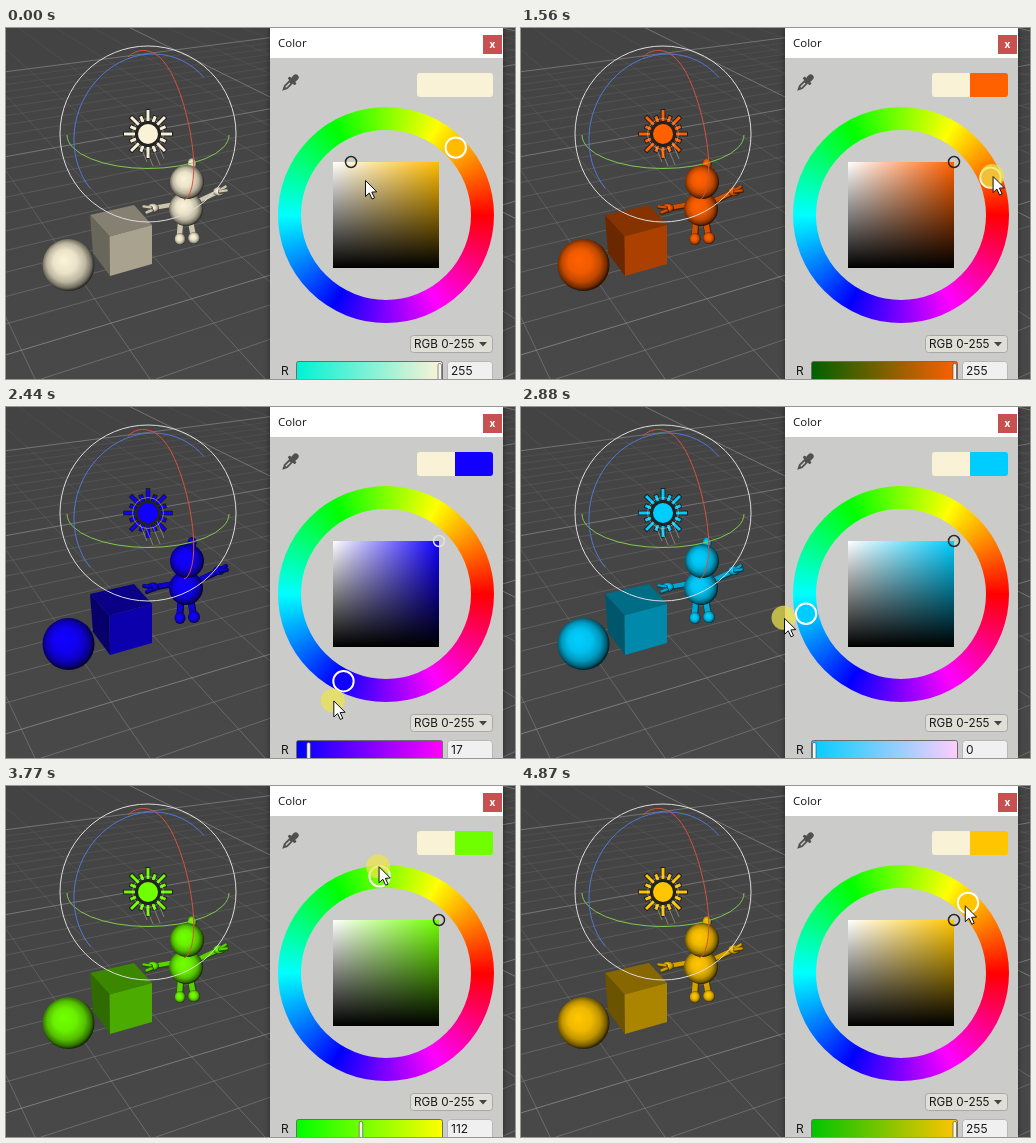
An HTML page with a canvas for the animation above (4990 ms loop, 509 px wide and 351 px high).

```html
<!DOCTYPE html>
<html lang="en">
<head>
<meta charset="utf-8">
<title>Light color picker</title>
<style>
html, body { margin: 0; width: 100%; height: 100%; overflow: hidden; background: #464646; }
canvas { display: block; width: 509px; height: 351px; }
</style>
</head>
<body>
<canvas id="stage" width="509" height="351"></canvas>
<script>
const ctx = document.getElementById('stage').getContext('2d');
const W = 509, H = 351, LOOP = 4990, STEP = 110.9;
const TAU = Math.PI * 2, RAD = Math.PI / 180;
const RING = { x: 380, y: 187, inner: 85, outer: 108, mid: 96.5, marker: 97 };
const BOX = { x: 327, y: 134, size: 106 };
const PALE = [250, 242, 214];
const UI = 'Inter, sans-serif';

// Keys: [step, value...]
const FREE = [[0, 359.5, 152.5], [2, 349, 141], [3, 346, 134], [7, 397, 132], [10, 434, 133], [12, 450, 120]];
const ORBIT = [[12, 44, 97], [13, 38, 98], [18, -38.7, 107], [22, -116, 119],
  [31, -233.5, 119], [37, -299, 94], [39, -309, 93], [40, -313, 93], [41, -313.7, 93]];
const SATURATION = [[3, 0.17], [7, 0.64], [10, 1]];

function sample(keys, k) {
  if (k <= keys[0][0]) return keys[0].slice(1);
  for (let i = 1; i < keys.length; i++) {
    const a = keys[i - 1], b = keys[i];
    if (k <= b[0]) {
      const u = (k - a[0]) / (b[0] - a[0]);
      return a.slice(1).map((v, j) => v + (b[j + 1] - v) * u);
    }
  }
  return keys[keys.length - 1].slice(1);
}

function hsv(h, s, v) {
  return [5, 3, 1].map(n => {
    const q = (((n + h / 60) % 6) + 6) % 6;
    return Math.round(255 * v * (1 - s * Math.max(0, Math.min(q, 4 - q, 1))));
  });
}

const css = (c, m = 1) => `rgb(${c.map(v => Math.round(v * m)).join(',')})`;

function polar(angle, r) {
  return [RING.x + r * Math.cos(angle * RAD), RING.y - r * Math.sin(angle * RAD)];
}

function poseAt(t) {
  const k = Math.min(41, Math.floor((t + 12) / STEP));
  const [angle, radius] = sample(ORBIT, k);
  const [sat] = sample(SATURATION, k);
  const picked = hsv(angle, sat, 1);
  return {
    angle, sat,
    color: k < 4 ? PALE : picked,
    red: picked[0],
    cursor: k < 12 ? sample(FREE, k) : polar(angle, radius),
    pressed: t < 4870 && ((k >= 3 && k <= 10) || k >= 12),
    focused: k >= 3 && k < 12
  };
}

function disc(x, y, r, fill) {
  ctx.beginPath();
  ctx.arc(x, y, r, 0, TAU);
  ctx.fillStyle = fill;
  ctx.fill();
}

function stroke(color, width) {
  ctx.strokeStyle = color;
  ctx.lineWidth = width;
  ctx.stroke();
}

function ringLine(x, y, r, color, width) {
  ctx.beginPath();
  ctx.arc(x, y, r, 0, TAU);
  stroke(color, width);
}

function poly(points, fill) {
  ctx.beginPath();
  points.forEach(p => ctx.lineTo(p[0], p[1]));
  ctx.closePath();
  ctx.fillStyle = fill;
  ctx.fill();
}

function line(x1, y1, x2, y2, color, width) {
  ctx.beginPath();
  ctx.moveTo(x1, y1);
  ctx.lineTo(x2, y2);
  stroke(color, width);
}

function panel(x, y, w, h, r, fill, border) {
  ctx.beginPath();
  ctx.roundRect(x, y, w, h, r);
  ctx.fillStyle = fill;
  ctx.fill();
  if (border) stroke(border, 1);
}

function text(str, x, y, font, color = '#161616') {
  ctx.font = font;
  ctx.fillStyle = color;
  ctx.fillText(str, x, y);
}

function fadeDown(top, bottom) {
  const g = ctx.createLinearGradient(0, 0, 0, H);
  g.addColorStop(0, top);
  g.addColorStop(1, bottom);
  return g;
}

function drawGround() {
  ctx.fillStyle = fadeDown('#434343', '#484848');
  ctx.fillRect(0, 0, W, H);
  const minor = fadeDown('rgba(150,150,150,.08)', 'rgba(160,160,160,.42)');
  const major = fadeDown('rgba(160,160,160,.5)', 'rgba(160,160,160,.6)');
  const families = [{ vx: 1640, at: -80, accent: 0 }, { vx: -215, at: 29, accent: 7 }];
  for (const { vx, at, accent } of families) {
    for (let i = -20; i <= 40; i++) {
      line(vx, -168, at + i * 115, H, (i - accent) % 10 ? minor : major, 1);
    }
  }
}

function ball(x, y, rx, ry, color) {
  ctx.save();
  ctx.translate(x, y);
  ctx.scale(rx, ry);
  const g = ctx.createRadialGradient(-0.2, -0.2, 0.05, -0.04, -0.04, 1.04);
  [[0, 1], [0.4, 0.94], [0.7, 0.75], [0.9, 0.45], [1, 0.14]]
    .forEach(([at, m]) => g.addColorStop(at, css(color, m)));
  disc(0, 0, 1, g);
  ctx.restore();
}

function limb(x1, y1, x2, y2, width, color) {
  ctx.lineCap = 'round';
  line(x1, y1, x2, y2, css(color, 0.3), width);
  line(x1 - 0.4, y1 - 0.6, x2 - 0.4, y2 - 0.6, css(color, 0.82), width - 1.6);
  ctx.lineCap = 'butt';
}

function drawFigure(c) {
  limb(175, 194, 174, 206, 7, c);
  limb(185, 194, 187, 205, 7, c);
  ball(174, 211, 5.5, 6, c);
  ball(188, 210, 6, 6, c);
  limb(168, 177, 151, 180, 6, c);
  limb(194, 173, 211, 165, 6, c);
  ball(147, 180, 6, 4.5, c);
  limb(145, 180, 138, 179, 4, c);
  limb(146, 183, 141, 185, 4, c);
  ball(213, 163.5, 6, 4.5, c);
  limb(214, 163, 220, 159, 4, c);
  limb(214, 164, 221, 163, 4, c);
  ball(180, 181, 17, 17, c);
  ball(186, 136, 4.5, 6, c);
  ball(181, 154, 17, 17, c);
}

function drawSun(c) {
  const x = 142, y = 106;
  for (const [color, grow] of [['#161616', 1.6], [css(c), 0]]) {
    for (let i = 0; i < 16; i++) {
      const a = i * TAU / 16, far = (i % 2 ? 19 : 24) + grow / 2, near = 13 - grow / 2;
      line(x + near * Math.cos(a), y + near * Math.sin(a),
        x + far * Math.cos(a), y + far * Math.sin(a), color, 3 + grow);
    }
  }
  disc(x, y, 12.5, '#222');
  disc(x, y, 10, css(c));
  ringLine(x, y, 15.5, 'rgba(225,220,205,.55)', 0.8);
}

function arc(x, y, rx, ry, turn, from, to, color) {
  ctx.beginPath();
  ctx.ellipse(x, y, rx, ry, turn * RAD, from * RAD, to * RAD);
  stroke(color, 1);
}

function drawGizmo() {
  ringLine(142, 106, 88, '#dcdcdc', 1);
  arc(142, 107, 81, 33.5, 0, 0, 180, '#83c84e');
  arc(142, 106, 81, 73, -69, 208, 386, '#5277d4');
  ctx.beginPath();
  ctx.moveTo(122, 29);
  ctx.bezierCurveTo(131, 20, 146, 19, 158, 34);
  ctx.bezierCurveTo(177, 56, 196, 134, 184, 165);
  ctx.quadraticCurveTo(182, 171, 178, 172);
  stroke('#d4523d', 1);
  for (const [x, y] of [[134, 117], [140, 121], [147, 120], [151, 114]]) {
    line(x, y, x + 7, y + 17, 'rgba(220,215,195,.5)', 0.8);
  }
}

function drawScene(c) {
  drawGround();
  ball(62.5, 237, 26, 26, c);
  poly([[84, 187], [128, 177], [146, 197], [103.5, 208.5]], css(c, 0.53));
  poly([[84, 187], [103.5, 208.5], [104, 248], [87, 225]], css(c, 0.42));
  poly([[103.5, 208.5], [146, 197], [146, 236], [104, 248]], css(c, 0.67));
  drawFigure(c);
  drawSun(c);
  drawGizmo();
}

function drawEyedropper() {
  ctx.save();
  ctx.translate(284, 55);
  ctx.rotate(Math.PI / 4);
  panel(-3, -11, 6, 8, 3, '#505050');
  panel(-5, -4.5, 10, 3, 1, '#505050');
  poly([[-2.5, -2], [2.5, -2], [2.5, 6], [0, 11], [-2.5, 6]], '#505050');
  line(0, 0, 0, 6, '#cbcbca', 1.4);
  ctx.restore();
}

function drawFrame(focused) {
  ctx.save();
  ctx.shadowColor = 'rgba(0,0,0,.4)';
  ctx.shadowBlur = 6;
  ctx.fillStyle = '#cbcbca';
  ctx.fillRect(264, 0, 233, H + 10);
  ctx.restore();
  ctx.fillStyle = '#fff';
  ctx.fillRect(264, 0, 233, 30);
  text('Color', 272, 19, '11.5px "Open Sans", sans-serif');
  ctx.fillStyle = '#c75050';
  ctx.fillRect(477, 7, 19, 19);
  text('x', 483.5, 20, 'bold 10px "Open Sans", sans-serif', '#fff');
  drawEyedropper();
  panel(404.5, 307.5, 82, 17, 3, '#dfdfd8', focused ? '#245a95' : '#a9a9a9');
  text('RGB 0-255', 408, 320, `11.7px ${UI}`);
  poly([[473, 314], [481, 314], [477, 318.5]], '#444');
}

function drawWheel(angle) {
  const g = ctx.createConicGradient(0, RING.x, RING.y);
  for (let i = 0; i <= 36; i++) g.addColorStop(i / 36, css(hsv(-i * 10, 1, 1)));
  ringLine(RING.x, RING.y, RING.mid, g, RING.outer - RING.inner);
  const [x, y] = polar(angle, RING.marker);
  disc(x, y, 10, css(hsv(angle, 1, 1)));
  ringLine(x, y, 10.2, '#fff', 2);
}

function drawShades({ angle, sat, color }) {
  const { x, y, size } = BOX;
  const tint = ctx.createLinearGradient(x, 0, x + size, 0);
  tint.addColorStop(0, '#fff');
  tint.addColorStop(1, css(hsv(angle, 1, 1)));
  const dark = ctx.createLinearGradient(0, y, 0, y + size);
  dark.addColorStop(0, 'rgba(0,0,0,0)');
  dark.addColorStop(1, '#000');
  for (const fill of [tint, dark]) {
    ctx.fillStyle = fill;
    ctx.fillRect(x, y, size, size);
  }
  const luma = color[0] * 0.3 + color[1] * 0.59 + color[2] * 0.11;
  ringLine(x + sat * size, y, 5.5, luma < 60 ? '#e4e4e4' : '#262626', 1.5);
}

function drawRedSlider({ color, red }) {
  const g = ctx.createLinearGradient(291, 0, 436, 0);
  g.addColorStop(0, css([0, color[1], color[2]]));
  g.addColorStop(1, css([255, color[1], color[2]]));
  text('R', 275, 347, `12px ${UI}`);
  panel(290.5, 333.5, 146, 24, 2, g, '#6c6c6c');
  panel(291.5 + red / 255 * 140.5, 335.5, 3.5, 20, 1.5, '#f4f4f4', 'rgba(70,70,70,.6)');
  panel(441.5, 333.5, 45, 24, 3, '#f0f0f0', '#b7b7b7');
  text(String(red), 445, 347, `12px ${UI}`);
}

function drawSwatch(color) {
  ctx.save();
  ctx.beginPath();
  ctx.roundRect(411, 45, 76, 24, 3);
  ctx.clip();
  ctx.fillStyle = css(PALE);
  ctx.fillRect(411, 45, 38, 24);
  ctx.fillStyle = css(color);
  ctx.fillRect(449, 45, 38, 24);
  ctx.restore();
}

function drawCursor([x, y], pressed) {
  if (pressed) disc(x - 1, y - 0.5, 12, 'rgba(235,228,75,.72)');
  ctx.save();
  ctx.translate(x, y);
  poly([[0, 0], [0, 16], [3.8, 12.5], [6.5, 18.5], [9, 17.4], [6.3, 11.6], [11.3, 11.3]], '#fff');
  stroke('#111', 1);
  ctx.restore();
}

function render(t) {
  const pose = poseAt(t);
  ctx.clearRect(0, 0, W, H);
  drawScene(pose.color);
  drawFrame(pose.focused);
  drawSwatch(pose.color);
  drawWheel(pose.angle);
  drawShades(pose);
  drawRedSlider(pose);
  drawCursor(pose.cursor, pose.pressed);
}

const start = performance.now();
function tick() {
  render((performance.now() - start) % LOOP);
  requestAnimationFrame(tick);
}
tick();
</script>
</body>
</html>
```
